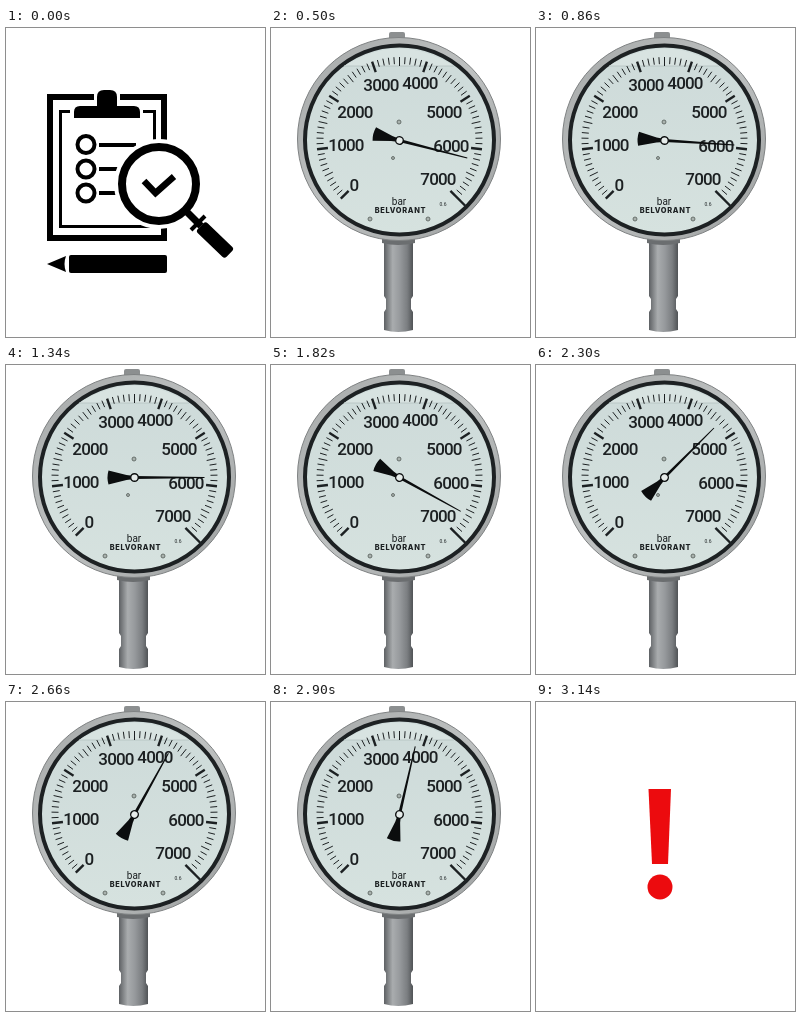
Recreate the animation shown at these times as an HTML page. Size 259x309 px, loop 3.64 s.

```html
<!DOCTYPE html>
<html lang="en">
<head>
<meta charset="utf-8">
<title>Pressure check</title>
<style>
  html, body { margin: 0; width: 100%; height: 100%; overflow: hidden; background: #fff; }
  svg { display: block; width: 100vw; height: 100vh; }
  text { text-anchor: middle; fill: #1c2022; font-family: Roboto, "Liberation Sans", sans-serif; }
  .num { font-size: 17px; font-weight: 500; letter-spacing: -.8px; }
  .brand { font: 800 7.4px Inter, "Liberation Sans", sans-serif; letter-spacing: .7px; }
  .line { fill: none; stroke: #000; }
</style>
</head>
<body>
<svg viewBox="0 0 259 309">
  <defs>
    <linearGradient id="steel">
      <stop offset="0" stop-color="#5d6063"/>
      <stop offset=".3" stop-color="#a9acae"/>
      <stop offset=".55" stop-color="#96999c"/>
      <stop offset=".8" stop-color="#7b7e81"/>
      <stop offset="1" stop-color="#505356"/>
    </linearGradient>
    <linearGradient id="rim" x2="1" y2="1">
      <stop offset="0" stop-color="#a5a8a8"/>
      <stop offset=".5" stop-color="#bec1c1"/>
      <stop offset="1" stop-color="#9b9e9e"/>
    </linearGradient>
    <linearGradient id="glass" x2="0" y2="1">
      <stop offset="0" stop-color="#cddad9"/>
      <stop offset="1" stop-color="#d6e2df"/>
    </linearGradient>
  </defs>

  <g id="check">
    <path class="line" stroke-width="6" d="M88 69H44V210H158V69H114"/>
    <path class="line" stroke-width="3" d="M64 83.5H54.5V198.5H148.5V83.5H137"/>
    <path d="M68 90V84Q68 78 74 78H91V69Q91 62 98 62H104Q111 62 111 69V78H128Q134 78 134 84V90Z"/>
    <g class="line" stroke-width="4">
      <circle cx="80" cy="116.5" r="8.5"/>
      <circle cx="80" cy="141" r="8.5"/>
      <circle cx="80" cy="165" r="8.5"/>
      <path d="M93 117H130M93 141H120M93 165H120"/>
    </g>
    <circle cx="153" cy="156" r="45" fill="#fff"/>
    <path d="M178 181L206 209" stroke="#fff" stroke-width="17"/>
    <circle class="line" cx="153" cy="156" r="37" stroke-width="8"/>
    <path class="line" stroke-width="6.5" d="M138 153L149.5 165L168 148.5"/>
    <path class="line" stroke-width="7" d="M179 182L195 198"/>
    <path class="line" stroke-width="4" d="M185 202L199 188"/>
    <rect x="-20" y="-7" width="40" height="14" rx="3" transform="translate(209 212) rotate(44)"/>
    <rect x="63" y="227" width="98" height="18" rx="2"/>
    <path d="M41 236L60 228Q57 236 60 244Z"/>
  </g>

  <g id="gauge">
    <path d="M113 208H142V268L140 271V281L142 284V302Q127 306 113 302V284L115 281V271L113 268Z" fill="url(#steel)"/>
    <path d="M111 210H144V215Q127 219 111 215Z" fill="#6b6e70"/>
    <rect x="118" y="4" width="16" height="8" rx="2" fill="#8c8f90"/>
    <circle cx="128" cy="111" r="101.5" fill="url(#rim)" stroke="#7f8283"/>
    <circle cx="128.5" cy="112" r="94.5" fill="url(#glass)" stroke="#1d2123" stroke-width="4"/>
    <path d="M73 38Q128 3 183 38Z" fill="#d8e3e1"/>
    <path d="M73 38H183" stroke="#b3c1bf" stroke-width=".8"/>
    <g id="scale" stroke="#1c2022"></g>
    <g id="labels"></g>
    <text x="128" y="177" font-size="10">bar</text>
    <text x="172" y="178" font-size="5">0.6</text>
    <text class="brand" x="129.5" y="185">BELVORANT</text>
    <g fill="#a9b2ae" stroke="#555c59" stroke-width=".8">
      <circle cx="128" cy="94" r="2"/>
      <circle cx="122" cy="130" r="1.5"/>
      <circle cx="99" cy="191" r="2"/>
      <circle cx="157" cy="191" r="2"/>
    </g>
    <g id="needle" fill="#0b0d0e">
      <path d="M-26-7Q-28 0-26 7L-8 2.500L0 1.500L70 .5V-.5L0-1.500L-8-2.500Z"/>
      <circle r="3.8" fill="#e6ecea" stroke="#0b0d0e" stroke-width="1.4"/>
    </g>
  </g>

  <g id="alert" fill="#ec0b0e">
    <path d="M112.5 87H135L132 162H116Z"/>
    <circle cx="124" cy="185" r="12.5"/>
  </g>
</svg>
<script>
const $ = id => document.getElementById(id);
const LOOP = 3640, STEP = 120, SWEEP = 270 / 70;

// Dial: 70 divisions from 0 to 7000 bar
let ticks = "";
for (let i = 0; i <= 70; i++) {
  const a = (135 + i * SWEEP) * Math.PI / 180;
  const inner = i % 10 == 0 ? 72 : i % 5 == 0 ? 74 : 76;
  const outer = i == 70 ? 93 : 83;
  const at = r => `${128.5 + r * Math.cos(a)} ${112 + r * Math.sin(a)}`;
  ticks += `<path d="M${at(inner)}L${at(outer)}" stroke-width="${i % 10 ? 1 : 2.4}"/>`;
}
$("scale").innerHTML = ticks;

const spots = [[83, 163], [75, 123], [84, 90], [110, 63], [149, 61], [173, 90], [180, 124], [167, 157]];
$("labels").innerHTML = spots.map(([x, y], i) =>
  `<text class="num" x="${x}" y="${y}">${i * 1000}</text>`).join("");

// Needle swings: start time, number of steps, first and last angle
const swings = [
  [500, 4, 14.5, 0],
  [1100, 1, 15, 15],
  [1340, 4, 0, 29],
  [1820, 4, 29, -45],
  [2420, 4, -45, -77]
];

function angle(t) {
  const [start, steps, from, to] = swings.findLast(s => t >= s[0]) || swings[0];
  const n = Math.max(0, Math.min(steps, Math.floor((t - start) / STEP)));
  return from + (to - from) * n / steps;
}

const show = (id, on) => $(id).setAttribute("visibility", on ? "visible" : "hidden");

function draw(t) {
  show("check", t < 500);
  show("gauge", t >= 500 && t < 3140);
  show("alert", t >= 3140);
  $("needle").setAttribute("transform", `translate(128.5 112.5) rotate(${angle(t)})`);
}

const begin = performance.now();
function tick() {
  draw((performance.now() - begin) % LOOP);
  requestAnimationFrame(tick);
}
tick();
</script>
</body>
</html>
```
